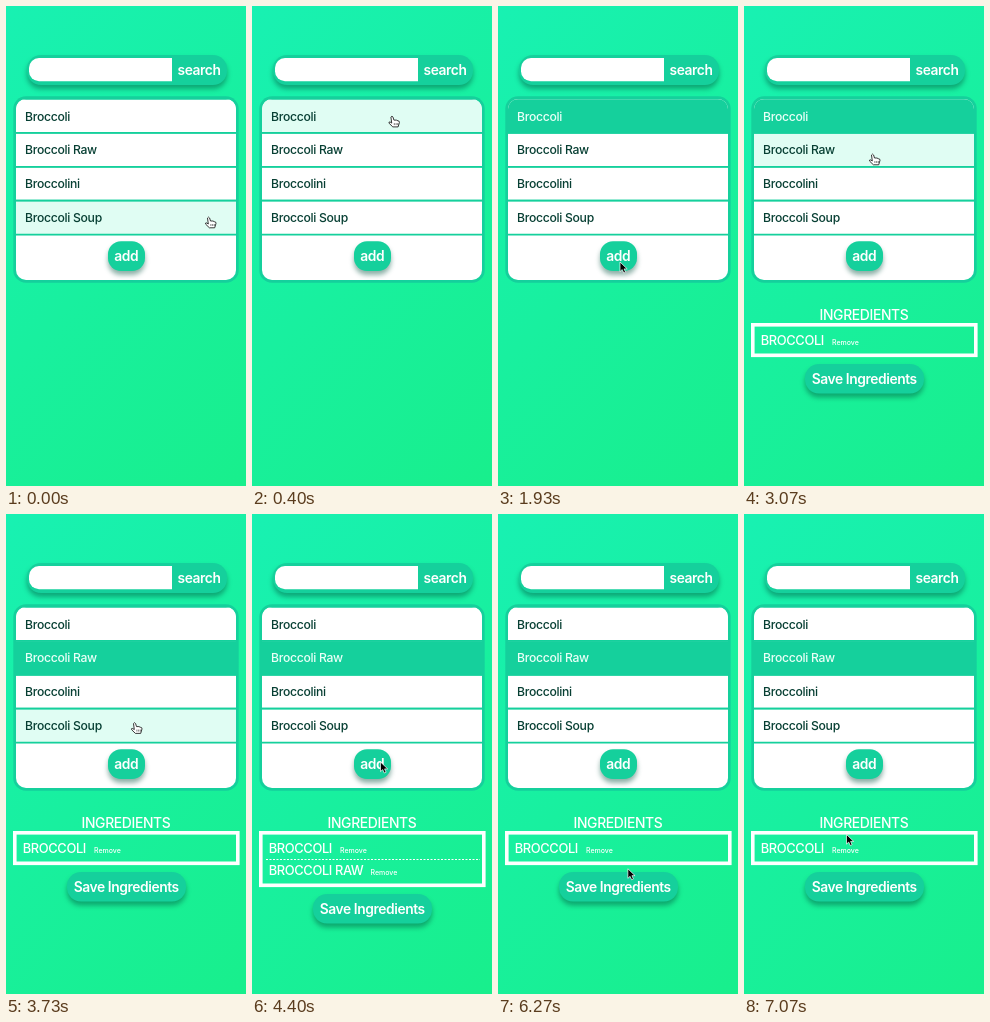
Write an HTML page that moves like this. It is 240 px wide and 480 px high and loops after 7140 ms.

```html
<!DOCTYPE html>
<html lang="en">
<head>
<meta charset="utf-8">
<title>Ingredient picker</title>
<style>
  html, body { margin: 0; width: 100%; height: 100%; overflow: hidden; }
  svg { display: block; width: 240px; height: 480px; background: linear-gradient(135deg, #18f1b2, #18ef8c); }
  text { font-family: Inter, "Liberation Sans", sans-serif; font-weight: 500; fill: #fff; }
  .row text { font-size: 12.2px; letter-spacing: -.3px; fill: #073f33; }
  .row rect { fill: #fff; }
  .row.hover rect { fill: #e0fdf3; }
  .row.on rect { fill: #15d09c; }
  .row.on text { fill: #e9fff7; }
  .row path { stroke: #15d09c; stroke-width: 1.7; }
  .button { font-size: 13.8px; font-weight: 600; letter-spacing: -.4px; text-anchor: middle; }
  .title { font-size: 13.9px; letter-spacing: -.35px; text-anchor: middle; }
  .item { font-size: 12.9px; letter-spacing: -.4px; }
  .remove { font-size: 7px; }
  .teal { fill: #15d09c; }
  .raised { filter: drop-shadow(0 4px 2.5px rgba(0, 80, 60, .45)); }
</style>
</head>
<body>
<svg viewBox="0 0 240 480">
  <clipPath id="inner"><rect x="10" y="93" width="220" height="181" rx="10"/></clipPath>

  <rect class="teal raised" x="21" y="49" width="200" height="30" rx="14"/>
  <path d="M166 52V75.3H33a10 10 0 0 1-10-10V62a10 10 0 0 1 10-10z" fill="#fff"/>
  <text class="button" x="193" y="69">search</text>

  <rect class="teal" x="7.3" y="90.3" width="225.4" height="186.4" rx="12.5"/>
  <rect x="10" y="93" width="220" height="181" rx="10" fill="#fff"/>
  <g id="rows" clip-path="url(#inner)"></g>
  <rect class="teal raised" x="102" y="235.3" width="37" height="29.7" rx="13"/>
  <text class="button" x="120.2" y="255">add</text>

  <g id="basket">
    <text class="title" x="120" y="313.5">INGREDIENTS</text>
    <rect id="box" x="8.8" y="318.8" width="223" fill="none" stroke="#fff" stroke-width="3.6"/>
    <text class="item" x="16.8" y="339">BROCCOLI</text>
    <text class="remove" x="88" y="339">Remove</text>
    <g id="second">
      <path d="M14 345.5H228" stroke="#fff" stroke-dasharray="2 1.5"/>
      <text class="item" x="16.8" y="361">BROCCOLI RAW</text>
      <text class="remove" x="118.5" y="361">Remove</text>
    </g>
    <g id="save">
      <rect class="teal raised" x="61" y="358" width="119" height="29.5" rx="14"/>
      <text class="button" x="120.2" y="377.8">Save Ingredients</text>
    </g>
  </g>

  <path id="arrow" d="M0 0V9.6L2.2 7.6 3.8 11 5.6 10.2 4.1 6.9H7.2Z" stroke="#fff" stroke-width=".7"/>
  <g id="hand" fill="#fff" stroke="#222" stroke-width=".9" stroke-linejoin="round">
    <path d="M-1 1Q0-.8 1.1 1L2 4 4.4 4 6.2 4.8Q7.4 4.6 7.5 6.3L6.2 10.8H.9L-2.8 7.2Q-3.6 5.6-1.8 5.9L-.2 7Z"/>
    <path d="M2.4 7V9M4.2 7V9M5.8 7V9" stroke-width=".6"/>
  </g>
</svg>
<script>
const LOOP = 7140, ROW = 33.9, TOP = 93;
const $ = id => document.getElementById(id);
const show = (id, on) => $(id).style.display = on ? "" : "none";
const place = (id, x, y) => $(id).setAttribute("transform", `translate(${x} ${y})`);

const names = ["Broccoli", "Broccoli Raw", "Broccolini", "Broccoli Soup"];
$("rows").innerHTML = names.map((name, i) => `<g class="row" transform="translate(0 ${TOP + ROW * i})">
  <rect x="8" y=".8" width="224" height="${ROW}"/>
  <path d="M8 0H232M8 ${ROW}H232"/>
  <text x="19" y="21.6">${name}</text></g>`).join("");
const rows = [...document.querySelectorAll(".row")];

// Pointer moves: where each one ends, and how far it bows sideways
const home = { x: 202.5, y: 211 };
const moves = [
  { from: 70, to: 470, x: 138, y: 107 },
  { from: 1070, to: 1730, x: 122, y: 256 },
  { from: 2470, to: 3070, x: 128.5, y: 148 },
  { from: 3530, to: 4070, x: 128.5, y: 248 },
  { from: 4670, to: 5330, x: 132, y: 357, bow: 20 },
  { from: 5400, to: 5930, x: 130, y: 355 },
  { from: 6270, to: 6930, x: 133, y: 273, bow: -16 },
  { from: 6930, to: 7070, x: 102.5, y: 320.5 }
];

function pointer(t) {
  let { x, y } = home;
  for (const m of moves) {
    const p = Math.min(1, Math.max(0, (t - m.from) / (m.to - m.from)));
    const e = 1 - (1 - p) ** 2;
    x += (m.x - x) * e + (m.bow || 0) * Math.sin(Math.PI * e);
    y += (m.y - y) * e;
  }
  return [x, y];
}

function draw(t) {
  const [x, y] = pointer(t);
  const picked = t < 800 ? -1 : t < 3400 ? 0 : 1;
  const hovered = Math.floor((y - TOP) / ROW);
  const inList = hovered >= 0 && hovered < names.length;
  rows.forEach((row, i) => {
    row.classList.toggle("on", i === picked);
    row.classList.toggle("hover", i === hovered);
  });

  const two = t >= 4200 && t < 5470;
  show("basket", t >= 2070);
  show("second", two);
  $("box").setAttribute("height", two ? 52.5 : 30.5);
  place("save", 0, two ? 22 : 0);

  show("hand", inList);
  show("arrow", !inList);
  place(inList ? "hand" : "arrow", x, y);
}

function tick() {
  draw(performance.now() % LOOP);
  requestAnimationFrame(tick);
}
tick();
</script>
</body>
</html>
```
